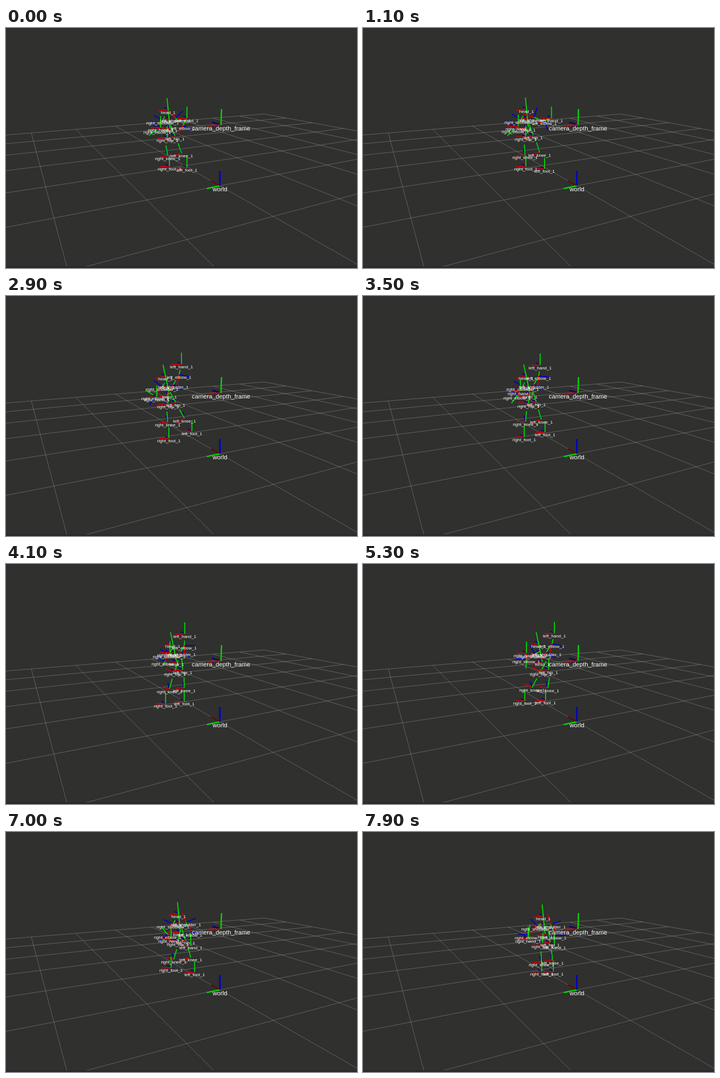
An HTML page with a canvas that plays this animation: 640 by 438 pixels, repeating every 8000 ms.

```html
<!DOCTYPE html>
<html lang="en">
<head>
<meta charset="utf-8">
<title>Skeleton frames</title>
<style>
html, body { margin: 0; width: 100%; height: 100%; overflow: hidden; background: #30302f; }
canvas { display: block; }
</style>
</head>
<body>
<canvas id="stage" width="640" height="438"></canvas>
<script>
const ctx = document.getElementById('stage').getContext('2d');
const LOOP = 8000, STEP = 100;

// Eased motion through [time, x, y] key points.
function path(...keys) {
  return t => {
    const next = keys.findIndex(k => k[0] > t);
    if (next < 0) return keys[keys.length - 1].slice(1);
    const [t0, x0, y0] = keys[next - 1], [t1, x1, y1] = keys[next];
    const s = (t - t0) / (t1 - t0), e = s * s * (3 - 2 * s);
    return [x0 + (x1 - x0) * e, y0 + (y1 - y0) * e];
  };
}

// Only the body centre, hands and feet are keyed; other joints follow from them.
const torso = path([0, 299, 182], [900, 300, 181], [2100, 319, 177], [2900, 298, 179],
  [4100, 311, 178], [5300, 327, 178], [7000, 318, 182], [7900, 332, 186]);
const rightHand = path([0, 282, 181], [1000, 283, 180], [2100, 293, 124], [2900, 275, 184],
  [4100, 299, 161], [5300, 298, 162], [7000, 301, 194]);
const leftHand = path([0, 330, 164], [900, 340, 164], [1800, 369, 163], [2100, 350, 166],
  [2900, 320, 124], [4100, 326, 127], [5300, 349, 126], [6200, 361, 132], [7000, 337, 206], [7900, 349, 206]);
const rightFoot = path([0, 298, 252], [2100, 296, 252], [2900, 297, 259], [4100, 291, 254],
  [5300, 295, 249], [7000, 301, 247], [7900, 326, 254]);
const leftFoot = path([0, 330, 254], [2100, 332, 258], [2900, 339, 246], [4100, 325, 250],
  [5300, 333, 248], [7000, 344, 255], [7900, 347, 254]);

const add = (p, x, y) => [p[0] + x, p[1] + y];
const dist = (a, b) => Math.hypot(b[0] - a[0], b[1] - a[1]);
const mid = (a, b) => [(a[0] + b[0]) / 2, (a[1] + b[1]) / 2];
const toward = (a, b, length) => {
  const k = length / (dist(a, b) || 1);
  return [(b[0] - a[0]) * k, (b[1] - a[1]) * k];
};

// Middle joint of a limb: the shorter the limb looks, the more it sags.
const bend = (a, b, reach, gain, out, base = 0) =>
  add(mid(a, b), out, base + (reach - dist(a, b)) * gain);

function line(a, b, color, width) {
  ctx.strokeStyle = color;
  ctx.lineWidth = width;
  ctx.beginPath();
  ctx.moveTo(...a);
  ctx.lineTo(...b);
  ctx.stroke();
}

function axes(o, red, green, blue, width = 1.8, blueColor = '#0000c8') {
  line(o, add(o, ...blue), blueColor, width);
  line(o, add(o, ...red), '#d00000', width);
  line(o, add(o, ...green), '#00d800', width);
}

function label(text, o, size = 8, drop = 5.5) {
  ctx.font = size + 'px "Liberation Sans", Arial, sans-serif';
  ctx.textAlign = 'center';
  ctx.textBaseline = 'middle';
  ctx.fillStyle = '#fff';
  ctx.fillText(text, o[0], o[1] + drop);
}

// Ground plane in perspective, with the world frame at u = v = 0.
const DU = 0.1075, DV = 0.2062, NEAR = 0.05;
function ground(u, v) {
  const a = u * DU, b = v * DV, w = 1 + a + b;
  return [(390 + 1495 * a + 14.8 * b) / w, (288 + 73.3 * (a + b)) / w];
}

function drawGrid() {
  const color = 'rgba(160,160,160,0.55)';
  for (let k = -5; k <= 5; k++) {
    const v0 = Math.max(-5, (NEAR - 1 - k * DU) / DV);
    const u0 = Math.max(-5, (NEAR - 1 - k * DV) / DU);
    line(ground(k, v0), ground(k, 5), color, 0.8);
    line(ground(u0, k), ground(5, k), color, 0.8);
  }
}

function drawFixed() {
  const world = [390, 288], camera = [392, 177];
  line(world, [374, 279], '#6c0000', 2.2);
  line(world, [366, 293], '#00d800', 2.4);
  line(world, [390, 261], '#0000cc', 2.8);
  axes(camera, [-25, 1.5], [1, -29], [-16, -5], 2.4, '#000088');
  label('world', world, 11.2, 7.3);
  label('camera_depth_frame', camera, 11.2, 7.3);
}

function drawSkeleton(t) {
  const names = [];

  // Green along the bone, red square to it, blue mostly in depth.
  const upright = (name, o, green, blue = [-7, -4]) => {
    axes(o, [green[1] * 0.87, 1 - green[0] * 0.87], green, blue, 1.8, '#000090');
    names.push([name, o]);
  };

  // Red along the bone, blue square to it and outward, green in the remaining depth.
  const armJoint = (name, o, end, side) => {
    const size = Math.min(19, dist(o, end));
    const [x, y] = toward(o, end, -side);
    const out = side * Math.sign(y || 1) * 19;
    const depth = -20 * Math.sqrt(1 - (size / 21) ** 2);
    axes(o, [x * size, y * size], [x * depth, y * depth], [y * out, -x * out]);
    names.push([name, o]);
  };

  const arm = (name, side, shoulder, elbow, hand) => {
    armJoint(name + '_shoulder', shoulder, elbow, side);
    armJoint(name + '_elbow', elbow, hand, side);
    upright(name + '_hand', hand, [0, -21]);
  };

  const leg = (name, side, hip, foot) => {
    const knee = bend(hip, foot, 60, 0.5, side * 1.3, 3);
    upright(name + '_hip', hip, toward(knee, hip, 21));
    upright(name + '_knee', knee, toward(foot, knee, 19), [-3, -11]);
    upright(name + '_foot', foot, [0, -20]);
  };

  const body = torso(t), right = rightHand(t), left = leftHand(t);
  const raised = Math.max(0, body[1] - Math.min(right[1], left[1]) - 20) / 35;
  const lean = -3.3 - 4 * raised;
  const head = add(body, lean, -33.5);
  const spine = toward(body, head, 21);
  upright('head', head, spine);
  upright('neck', mid(body, head), spine);
  upright('torso', body, spine);

  const rightShoulder = add(body, -13.5, -14);
  const leftShoulder = add(body, 12.7 + 0.75 * lean, -18);
  arm('right', -1, rightShoulder, bend(rightShoulder, right, 40, 0.4, -8), right);
  arm('left', 1, leftShoulder, bend(leftShoulder, left, 40, 0.7, 3), left);
  leg('right', -1, add(body, -6.5 - 0.5 * lean, 17.5), rightFoot(t));
  leg('left', 1, add(body, 7 - 0.6 * lean, 14.5), leftFoot(t));

  for (const [name, o] of names) label(name + '_1', o);
}

function draw(now) {
  const t = Math.floor((now % LOOP) / STEP) * STEP;
  ctx.fillStyle = '#30302f';
  ctx.fillRect(0, 0, 640, 438);
  drawGrid();
  ctx.fillStyle = '#2d282d';
  ctx.fillRect(0, 435, 640, 3);
  ctx.save();
  ctx.translate(0, 0.5);
  drawSkeleton(t);
  ctx.restore();
  drawFixed();
  requestAnimationFrame(draw);
}
requestAnimationFrame(draw);
</script>
</body>
</html>
```
